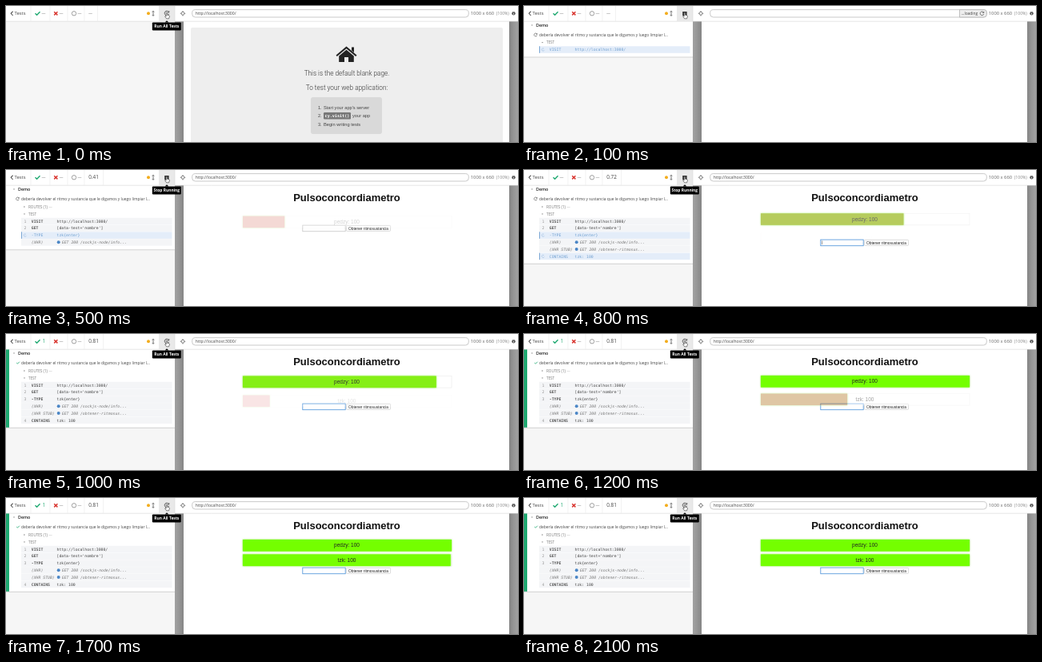
An HTML page that plays this animation: 640x170 px, repeating every 2.2 s.

```html
<!DOCTYPE html>
<html lang="es">
<head>
<meta charset="utf-8">
<title>Test runner</title>
<style>
html, body { margin: 0; width: 100%; height: 100%; overflow: hidden; background: #fff; }
svg { display: block; }
text { font-family: "Open Sans", sans-serif; font-size: 5px; fill: #444; white-space: pre; }
.mid { text-anchor: middle; }
.head { font-size: 6.4px; }
.dash { font-size: 5px; fill: #777; }
.arial { font-family: "Liberation Sans", Arial, sans-serif; }
.mono, .row text { font-family: "DejaVu Sans Mono", monospace; font-size: 4.82px; }
.light { font-family: Roboto, sans-serif; font-weight: 300; font-size: 8.2px; fill: #333; }
.tip { font-weight: 700; font-size: 4.9px; fill: #fff; }
.line { fill: none; stroke: #555; stroke-width: .8; }
.sep { stroke: #ececec; stroke-width: .7; }

.row rect { fill: #f4f5f7; }
.row .name { font-weight: 700; fill: #555; }
.row .num { fill: #999; }
.row.xhr text { font-style: italic; font-weight: 400; fill: #777; }
.row.busy .bg { fill: #e4edf9; }
.row.busy text { fill: #6f9fd0; }
.row.busy .name { font-weight: 400; }
.row .spin, .row .edge { display: none; }
.row.busy .spin, .row.busy .edge { display: inline; }
.row.busy .num { display: none; }
.row .edge { fill: #6f9fd0; }
.row .spin { fill: none; stroke: #8fb2d8; stroke-width: .5; }

.score, .score .fill { animation: rise 1s ease-in-out both paused; animation-delay: var(--at); }
.score .fill { animation-name: grow; filter: drop-shadow(0 0 1px #8cf03c); }
.score text { font-size: 6.5px; fill: #222; }
@keyframes rise { from { opacity: 0; transform: translateY(7px); } to { opacity: 1; transform: none; } }
@keyframes grow { from { width: 0; fill: crimson; } to { width: 261px; fill: #74ff00; } }
</style>
</head>
<body>
<svg width="640" height="170" viewBox="0 0 640 170">
  <defs>
    <linearGradient id="gutter">
      <stop offset="0" stop-color="#a2a2a2"/><stop offset=".5" stop-color="#969696"/><stop offset="1" stop-color="#858585"/>
    </linearGradient>
    <path id="reload" class="line" d="M1.9 -1.3A2.3 2.3 0 1 0 2.2 .7M2.3 -2.4V-.8H.7"/>
    <path id="check" d="M-3 0L-.9 2L3 -2.1" fill="none" stroke-width="1.4"/>
    <path id="down" d="M-1.2 -.6H1.2L0 .9Z" fill="#999"/>
  </defs>

  <!-- reporter panel -->
  <rect y="19" width="211" height="151" fill="#f6f6f6"/>
  <g data-on="1-21">
    <rect id="shade" y="19" width="211" fill="#d2d2d2"/>
    <rect id="sheet" y="19" width="211" fill="#fff"/>
    <rect id="stripe" y="19" width="4" fill="#1fa971" data-on="9-21"/>
    <use href="#down" x="10" y="24"/>
    <text x="15" y="26" font-weight="600" style="font-size:5.3px;fill:#222">Demo</text>
    <use href="#reload" transform="translate(14.5 36) scale(.8)" data-on="1-8"/>
    <use href="#check" transform="translate(15 36) scale(.6)" stroke="#1fa971" data-on="9-21"/>
    <text x="19" y="37.8" style="font-size:4.9px">debería devolver el ritmo y sustancia que le digamos y luego limpiar l...</text>
    <g data-on="2-21">
      <path d="M22.4 44.8L24 46L22.4 47.2Z" fill="#999"/>
      <text x="28" y="47.7" style="font-size:4.6px;fill:#777">ROUTES (1) <tspan fill="#bbb">—</tspan></text>
    </g>
    <g id="log">
      <use href="#down" x="23" y="55"/>
      <text x="28" y="56.7" style="font-size:4.6px;fill:#777">TEST</text>
    </g>
  </g>

  <!-- page area -->
  <rect x="211" y="19" width="429" height="151" fill="#929292"/>
  <rect x="211" y="19" width="11" height="151" fill="url(#gutter)"/>
  <rect x="629" y="19" width="11" height="151" fill="url(#gutter)" transform="rotate(180 634.5 94.5)"/>
  <rect x="222" y="19" width="407" height="151" fill="#fff"/>

  <g data-on="0-0">
    <rect x="231" y="27" width="390" height="150" rx="2" fill="#eee"/>
    <path d="M425.5 50.5L438.5 61.5L437.2 63L425.5 53.2L413.8 63L412.5 61.5ZM432 51.5H435V58L432 55.5ZM425.5 54.8L434.8 62.6V70H428V64H423V70H416.2V62.6Z" fill="#222"/>
    <text class="light mid" x="426" y="87">This is the default blank page.</text>
    <text class="light mid" x="426" y="105">To test your web application:</text>
    <rect x="381" y="114" width="89" height="46" rx="3" fill="#d9d9d9"/>
    <g id="steps"></g>
    <rect x="397" y="133" width="34" height="8.4" rx="1.2" fill="#777"/>
    <text class="mono" x="398.6" y="139" style="font-size:5.1px;font-weight:700;fill:#fff">cy.visit()</text>
  </g>

  <g data-on="2-21">
    <text class="arial mid" x="426" y="39.3" style="font-size:13px;font-weight:700;fill:#111">Pulsoconcordiametro</text>
    <g id="form">
      <rect id="field" x="370.8" y="-3.7" width="53.4" height="7.6" fill="#fff" stroke-width=".9"/>
      <path d="M372.6 -2.3V2.3" stroke="#333" stroke-width=".5" data-on="8-8"/>
      <rect x="425.4" y="-3.4" width="55.2" height="7" rx="1" fill="#fff" stroke="#c4c4c4" stroke-width=".6"/>
      <text class="arial mid" x="453" y="1.8" style="font-size:4.85px;fill:#222">Obtener ritmosustancia</text>
    </g>
    <g id="scores"></g>
  </g>

  <!-- top bar -->
  <rect width="640" height="19" fill="#fff"/>
  <path d="M0 19.2H640" stroke="#dcdcdc" stroke-width=".7"/>
  <path class="sep" d="M31 0V19M55 0V19M77 0V19M98 0V19"/>
  <path class="sep" d="M114.5 0V19" data-on="0-1"/>
  <path class="sep" d="M121.5 0V19" data-on="2-21"/>
  <path d="M8.6 6.6L6.2 9.3L8.6 12" class="line" style="stroke-width:1.1"/>
  <text x="10.6" y="11.3" style="font-size:5.9px">Tests</text>
  <use href="#check" x="39.5" y="9.3" stroke="#1fa971"/>
  <text class="dash" x="44.6" y="11" data-on="0-8">—</text>
  <text class="head" x="45.4" y="11.4" style="fill:#1fa971" data-on="9-21">1</text>
  <path d="M60.2 7.2L64.4 11.4M64.4 7.2L60.2 11.4" stroke="#d9362f" stroke-width="1.5"/>
  <text class="dash" x="66.4" y="11">—</text>
  <circle class="line" cx="85" cy="9.3" r="2.7" style="stroke:#888"/>
  <text class="dash" x="89.6" y="11">—</text>
  <text class="dash" x="103" y="11" data-on="0-1">—</text>
  <text class="head" id="clock" x="103.2" y="11.4" data-on="2-21"></text>
  <circle cx="178" cy="9.3" r="2" fill="#f3ad1d"/>
  <path d="M184 6.4V12.2M182.8 7.5L184 6.2L185.2 7.5M182.8 11.1L184 12.4L185.2 11.1" class="line"/>

  <rect x="191" width="20" height="19" fill="#e9e9e9"/>
  <path class="sep" d="M211 0V19" style="stroke:#ddd"/>
  <use href="#reload" transform="translate(201 9) scale(1.2)" data-on="0-0 9-21"/>
  <rect x="198.2" y="7" width="5.4" height="5.2" fill="#333" data-on="1-8"/>
  <path transform="translate(0 -.8)" d="M200.2 9.2Q201 8.5 201.6 9.3V12L203.9 12.6Q204.7 13 204.3 14.3L203.6 16.6H200.6L198.7 13.9Q198.6 12.8 200.2 13.7Z" fill="#fff" stroke="#333" stroke-width=".6"/>

  <g class="line" style="stroke:#777">
    <circle cx="221" cy="9.3" r="2"/>
    <path d="M221 6V8M221 10.6V12.6M217.7 9.3H219.7M222.3 9.3H224.3"/>
  </g>
  <rect x="232.7" y="4.6" width="345.6" height="9.4" rx="4" fill="#fff" stroke="#b4b4b4" stroke-width=".7"/>
  <text x="236.8" y="11" style="font-size:5.05px" data-on="0-0 3-21">http://localhost:3000/</text>
  <g data-on="1-2">
    <path d="M544.5 4.6H575Q578.3 4.6 578.3 8V10.6Q578.3 14 575 14H544.5Z" fill="#eee" stroke="#aaa" stroke-width=".7"/>
    <text x="546.5" y="11" style="font-size:4.9px">...loading</text>
    <use href="#reload" x="572.5" y="9.3"/>
  </g>
  <text x="580.8" y="11.3" style="font-size:5.8px;fill:#666">1000 x 660</text>
  <text x="612.8" y="11.1" style="font-size:5.1px;fill:#888">(100%)</text>
  <circle cx="634.5" cy="9.3" r="2.2" fill="#555"/>
  <path d="M634.5 8.9V10.7M634.5 7.6V8.2" stroke="#fff" stroke-width=".7"/>

  <g data-on="0-0 2-21" transform="translate(0 -.6)">
    <path d="M198.6 21.2L201 18.8L203.4 21.2Z"/>
    <rect x="182.8" y="21" width="36" height="10" rx="1.2"/>
    <text id="tip" class="tip mid" x="200.8" y="27.8"></text>
  </g>
</svg>
<script>
const STEP = 100, LOOP = 2200, PITCH = 8.77;
const $ = id => document.getElementById(id);
const add = (id, markup) => $(id).insertAdjacentHTML('beforeend', markup);

// busy from start until done, in steps
const commands = [
  { num: 1, name: 'VISIT', msg: 'http://localhost:3000/', start: 1, done: 3 },
  { num: 2, name: 'GET', msg: "[data-test='nombre']", start: 3, done: 4 },
  { num: 3, name: '-TYPE', msg: 'tzk{enter}', start: 4, done: 9 },
  { name: '(XHR)', msg: 'GET 200 /sockjs-node/info...', start: 5 },
  { name: '(XHR STUB)', msg: 'GET 200 /obtener-ritmosus...', start: 7 },
  { num: 4, name: 'CONTAINS', msg: 'tzk: 100', start: 7, done: 9 },
];
const scores = [
  { name: 'pedzy', y: 52, start: 190 },
  { name: 'tzk', y: 70.4, start: 750 },
];

commands.forEach((c, i) => add('log', `
  <g class="row ${c.num ? '' : 'xhr'}" transform="translate(0 ${64 + i * PITCH})">
    <rect class="bg" x="19" y="-4.2" width="188.5" height="8.5"/>
    <rect class="edge" x="19" y="-4.2" width=".9" height="8.5"/>
    <path class="spin" d="M25 -1A1.6 1.6 0 1 0 25.3 .5"/>
    <text class="num" x="22.6" y="1.7">${c.num || ''}</text>
    <text class="name" x="31.8" y="1.7">${c.name}</text>
    ${c.num ? '' : '<circle cx="65.7" r="2" fill="#4b86c6"/>'}
    <text x="${c.num ? 63.5 : 69.8}" y="1.7">${c.msg}</text>
  </g>`));

scores.forEach(s => add('scores', `
  <g class="score">
    <rect x="296" y="${s.y}" width="261" height="14.6" fill="#fff" stroke="#ececec" stroke-width=".7"/>
    <rect class="fill" x="296" y="${s.y}" height="14.6"/>
    <text class="arial mid" x="426" y="${s.y + 9.4}">${s.name}: 100</text>
  </g>`));

["Start your app's server", '', 'Begin writing tests'].forEach((label, i) => add('steps', `
  <g transform="translate(0 ${129 + i * 10.3})">
    <text class="arial" x="390" style="font-size:5.6px">${i + 1}.</text>
    <text class="arial" x="${label ? 397 : 433}" style="font-size:5.7px">${label || 'your app'}</text>
  </g>`));

const show = (el, on) => { el.style.display = on ? '' : 'none'; };
const timed = [...document.querySelectorAll('[data-on]')].map(el => ({
  el, spans: el.dataset.on.split(' ').map(s => s.split('-').map(Number)),
}));
const rows = [...document.querySelectorAll('.row')];
const bars = [...document.querySelectorAll('.score')];

function draw(k) {
  const t = k * STEP;
  timed.forEach(({ el, spans }) => show(el, spans.some(([a, b]) => k >= a && k <= b)));

  rows.forEach((row, i) => {
    const { start, done } = commands[i];
    show(row, k >= start);
    row.classList.toggle('busy', k < done);
  });
  const shift = k < 2 ? -9.5 : 0;
  const count = commands.filter(c => k >= c.start).length;
  const height = 64 + shift + count * PITCH - 18.8;
  $('log').setAttribute('transform', `translate(0 ${shift})`);
  $('sheet').setAttribute('height', height);
  $('stripe').setAttribute('height', height);
  $('shade').setAttribute('height', height + 1);

  bars.forEach((bar, i) => {
    show(bar, t >= scores[i].start);
    bar.style.setProperty('--at', `${scores[i].start - t}ms`);
  });
  const listed = scores.filter(s => t >= s.start).length;
  $('form').setAttribute('transform', `translate(0 ${54.8 + listed * 18})`);
  $('field').setAttribute('stroke', k < 6 ? '#ccc' : '#5b9bdc');

  $('clock').textContent = Math.min(.81, .41 + (k - 5) * .1033).toFixed(2);
  $('tip').textContent = k > 0 && k < 9 ? 'Stop Running' : 'Run All Tests';
}

let last = -1;
function tick() {
  const k = Math.floor(performance.now() % LOOP / STEP);
  if (k !== last) draw(last = k);
  requestAnimationFrame(tick);
}
tick();
</script>
</body>
</html>
```
